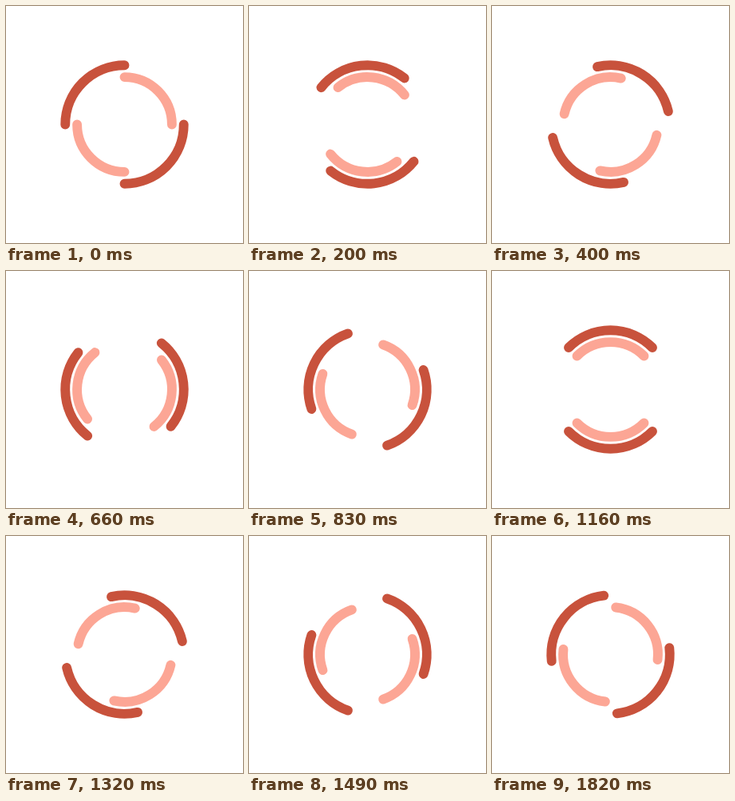
Write an HTML page that moves like this. It is 297 px wide and 297 px high and loops after 1.85 s.

```html
<!DOCTYPE html>
<html lang="en">
<head>
<meta charset="utf-8">
<title>Double ring spinner</title>
<style>
  html, body { margin: 0; width: 100%; height: 100%; overflow: hidden; background: #fff; }
  svg { display: block; width: 100%; height: 100%; }
</style>
</head>
<body>
<svg viewBox="-50 -50 100 100" fill="none" stroke-width="4" stroke-linecap="round">
  <path id="outer" stroke="#c8523c" d="M25 0A25 25 0 0 1 0 25M-25 0A25 25 0 0 1 0 -25"/>
  <path id="inner" stroke="#fca695" d="M0 20A20 20 0 0 1 -20 0M0 -20A20 20 0 0 1 20 0"/>
</svg>
<script>
  const LOOP = 1850;
  const STEPS = 56;
  const GROUP_MS = 530;
  const GROUP_STEPS = 16;
  const outer = document.getElementById('outer');
  const inner = document.getElementById('inner');

  // Steps last 30, 40, 30 ms in turn; the pattern restarts every 16 steps.
  function stepAt(ms) {
    const shifted = ms - 30;
    const group = Math.floor(shifted / GROUP_MS);
    const local = shifted - group * GROUP_MS;
    const rest = local % 100;
    const sub = rest >= 70 ? 2 : rest >= 30 ? 1 : 0;
    return 1 + group * GROUP_STEPS + Math.floor(local / 100) * 3 + sub;
  }

  function render(ms) {
    const angle = stepAt(ms % LOOP) * 360 / STEPS;
    outer.setAttribute('transform', `rotate(${angle})`);
    inner.setAttribute('transform', `rotate(${-angle})`);
  }

  const start = performance.now();
  function tick() {
    render(performance.now() - start);
    requestAnimationFrame(tick);
  }
  tick();
</script>
</body>
</html>
```
